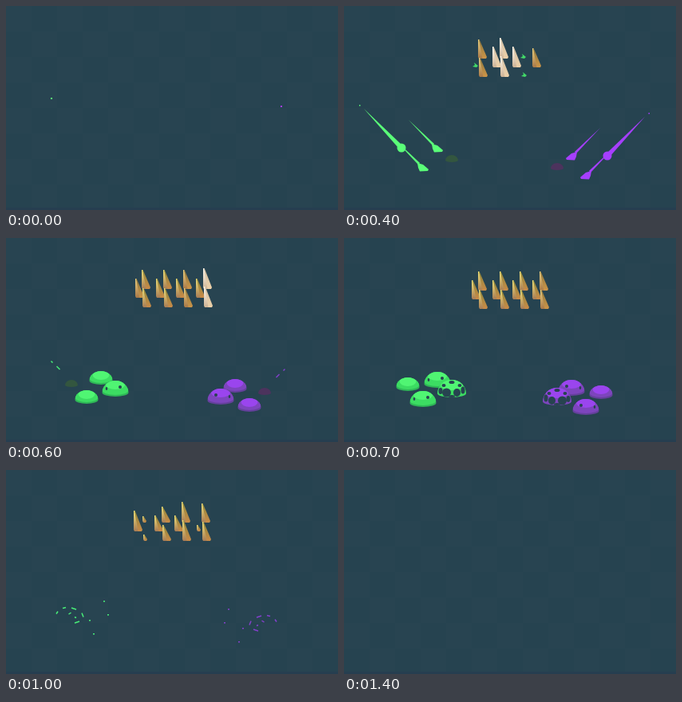
An HTML page with a canvas that plays this animation: 416x256 px, repeating every 1.8 s.

```html
<!DOCTYPE html>
<html lang="en">
<head>
<meta charset="utf-8">
<title>Slimes and spikes</title>
<style>
html, body { margin: 0; width: 100%; height: 100%; overflow: hidden; background: #274350; }
canvas { display: block; }
</style>
</head>
<body>
<canvas id="stage" width="416" height="256"></canvas>
<script>
const ctx = document.getElementById('stage').getContext('2d');
const LOOP = 1800, STEP = 100, LAST_STEP = 14;
const GROUND = '#274350';

const GREEN = { bright: '#5aff78', top: '#50f573', body: '#3cdc62', rim: '#2fb757', shadow: '#33563f', speck: '#48ef78' };
const PURPLE = { bright: '#a63fff', top: '#9a45ee', body: '#7d45bd', rim: '#65409c', shadow: '#4c335d', speck: '#8440cc' };

// Launch point and starting step, listed back to front.
const SLIMES = [
  { x: 39, y: 102, start: 1 },
  { x: 2, y: 108, start: 2 },
  { x: 57, y: 115, start: 0 },
  { x: 21, y: 126, start: 1 }
];
const LANDING = { x: 78, y: 75 };

const SPIKE_ROWS = [
  { xs: [173, 200, 225, 250], y: 66, starts: [2, 3, 4, 5] },
  { xs: [165, 191, 216, 241], y: 77, starts: [4, 3, 3, 2] },
  { xs: [174, 201, 226, 251], y: 89, starts: [2, 3, 4, 5] }
];
const SPIKE_HEIGHTS = [6, 26, 24, 24, 24, 24, 26, 20, 8];
const SPIKE_COLORS = {
  fresh: { lit: ['#fffaf0', '#cdb294'], shaded: ['#d2c1a8', '#ecd0a8'] },
  warm: { lit: ['#e8cf80', '#a87848'], shaded: ['#8f7a40', '#cb9448'] },
  ripe: { lit: ['#efe27a', '#a87c55'], shaded: ['#8f8a3c', '#c88a48'] }
};
const SHAKE = { 6: [2, -2] };

function polygon(points, color) {
  ctx.fillStyle = color;
  ctx.beginPath();
  points.forEach(([x, y]) => ctx.lineTo(x, y));
  ctx.fill();
}

function ellipse(x, y, rx, ry, color) {
  ctx.fillStyle = color;
  ctx.beginPath();
  ctx.ellipse(x, y, rx, ry, 0, 0, Math.PI * 2);
  ctx.fill();
}

function dash(x, y, dx, dy, color) {
  ctx.strokeStyle = color;
  ctx.lineWidth = 1.5;
  ctx.beginPath();
  ctx.moveTo(x - dx, y - dy);
  ctx.lineTo(x + dx, y + dy);
  ctx.stroke();
}

function verticalGradient(top, bottom, [from, to]) {
  const gradient = ctx.createLinearGradient(0, top, 0, bottom);
  gradient.addColorStop(0, from);
  gradient.addColorStop(1, to);
  return gradient;
}

function comet(x0, y0, x1, y1, neck, radius, color) {
  const length = Math.hypot(x1 - x0, y1 - y0);
  const nx = (y0 - y1) / length * neck, ny = (x1 - x0) / length * neck;
  polygon([[x0, y0], [x1 + nx, y1 + ny], [x1 - nx, y1 - ny]], color);
  if (radius) ellipse(x1, y1, radius, radius, color);
}

function domePath(width, top, bottom, sag = 5) {
  const r = width / 2, seam = bottom - sag;
  ctx.beginPath();
  ctx.ellipse(0, seam, r, seam - top, 0, Math.PI, Math.PI * 2);
  ctx.ellipse(0, seam, r, sag, 0, 0, Math.PI);
  ctx.closePath();
}

function dome(c, width, top, bottom) {
  ctx.save();
  domePath(width, top, bottom);
  ctx.clip();
  ctx.fillStyle = c.rim;
  ctx.fillRect(-20, -20, 40, 40);
  ellipse(0, bottom - 8, width / 2, 6, c.body);
  ctx.fillStyle = c.body;
  ctx.fillRect(-20, -20, 40, bottom + 12);
  ellipse(0, top + 5, width * 0.36, 6, c.top);
  ctx.restore();
}

function holedDome(c) {
  ctx.save();
  domePath(36, -12, 10);
  ctx.clip();
  ctx.fillStyle = c.body;
  ctx.fillRect(-20, -20, 40, 40);
  ellipse(0, -6, 14, 7, c.top);
  [[0, -9, 3.5, 2], [-6.5, 4, 5.5, 5.5], [6.5, 4, 4.5, 5], [-14, 2, 2.5, 4],
   [14, 1, 2.5, 4.5], [-10, -5, 2.5, 2], [10, -5, 2.5, 2], [0, 9, 4, 2]]
    .forEach(([x, y, rx, ry]) => ellipse(x, y, rx, ry, GROUND));
  ctx.restore();
}

function burst(c) {
  [[-16, -4, 1, -1.5], [-7, -10, 2, -0.5], [5, -9, 3, 1], [16, -1, 1, 2.5],
   [9, 8, 3, -1], [0, -3, 1.5, -1], [7, 2, 1, 0.5]]
    .forEach(([x, y, dx, dy]) => dash(x, y, dx, dy, c.speck));
}

function flight(phase, c, leavesWisp) {
  const { bright } = c;
  ctx.fillStyle = bright;
  if (phase === 0) ctx.fillRect(-1, 0, 2, 2);
  if (phase === 1) comet(-1, -1, 9, 9, 2.5, 2.8, bright);
  if (phase === 2) {
    ctx.fillRect(17, 16, 1.5, 1.5);
    comet(23, 21, 70, 70, 3, 5.5, bright);
  }
  if (phase === 3) comet(42, 41, 73, 72, 1.5, 0, bright);
  if (phase === 4 && leavesWisp) {
    dash(53.5, 49.5, 1, 1, c.speck);
    dash(61.5, 57, 2, 2, c.speck);
  }
}

function landed(phase, c) {
  switch (phase) {
    case 3:
      polygon([[-7, -4], [0, -2], [7, 4], [6, 6], [-4, 6.5], [-6, 2]], c.bright);
      break;
    case 4:
      domePath(16, -3, 6, 2.5);
      ctx.fillStyle = c.shadow;
      ctx.fill();
      break;
    case 5:
      dome(c, 29, -8, 9);
      break;
    case 6:
      dome(c, 33, -9, 11);
      ellipse(-11, 1, 1.3, 2, GROUND);
      ellipse(6, -1, 2, 2, GROUND);
      break;
    case 7:
      holedDome(c);
      break;
    case 8:
      burst(c);
      break;
    case 9:
      ctx.fillStyle = c.speck;
      ctx.fillRect(5, -13, 2, 1.5);
      ctx.fillRect(10, 4, 2, 1.5);
  }
}

function slimes(step, colors) {
  for (const { x, y, start } of SLIMES) {
    const phase = step - start;
    ctx.save();
    ctx.translate(x, y);
    flight(phase, colors, start === 2);
    ctx.translate(LANDING.x, LANDING.y);
    landed(phase, colors);
    ctx.restore();
  }
}

function sprout(x, base) {
  polygon([[x - 2, base - 6], [x + 3, base - 2], [x + 1, base], [x - 4, base - 1], [x - 1, base - 3]], '#42d968');
}

function spike(x, base, phase) {
  if (phase < 0 || phase > 8) return;
  if (phase === 0) return sprout(x, base);
  const small = phase === 8;
  const top = base - SPIKE_HEIGHTS[phase];
  const left = x - (small ? 2 : 5), right = x + (small ? 3 : 6);
  const ridge = (left + right) / 2;
  const { lit, shaded } = SPIKE_COLORS[phase === 1 ? 'fresh' : phase === 2 ? 'warm' : 'ripe'];
  polygon([[left, top], [left + 1.5, top], [ridge + 1, base], [left + 1, base], [left, base - 2]],
    verticalGradient(top, base, lit));
  polygon([[left + 1, top], [left + 2, top + 1], [right, base - 2], [right - 1, base], [ridge, base]],
    verticalGradient(top, base, shaded));
}

function background() {
  for (let row = 0; row < 8; row++) {
    for (let col = 0; col < 13; col++) {
      ctx.fillStyle = (row + col) % 2 ? '#264350' : '#284451';
      ctx.fillRect(col * 32, row * 32, 32, 32);
    }
  }
  ctx.fillStyle = '#263e50';
  ctx.fillRect(0, 253, 416, 3);
}

function draw(step) {
  background();
  ctx.save();
  ctx.translate(...(SHAKE[step] || [0, 0]));
  for (const { xs, y, starts } of SPIKE_ROWS) {
    xs.forEach((x, i) => spike(x, y, step - starts[i]));
  }
  slimes(step, GREEN);
  ctx.translate(402, 10);
  ctx.scale(-1, 1);
  slimes(step, PURPLE);
  ctx.restore();
}

const began = performance.now();
function tick() {
  const time = (performance.now() - began) % LOOP;
  draw(Math.min(LAST_STEP, Math.floor(time / STEP)));
  requestAnimationFrame(tick);
}
tick();
</script>
</body>
</html>
```
